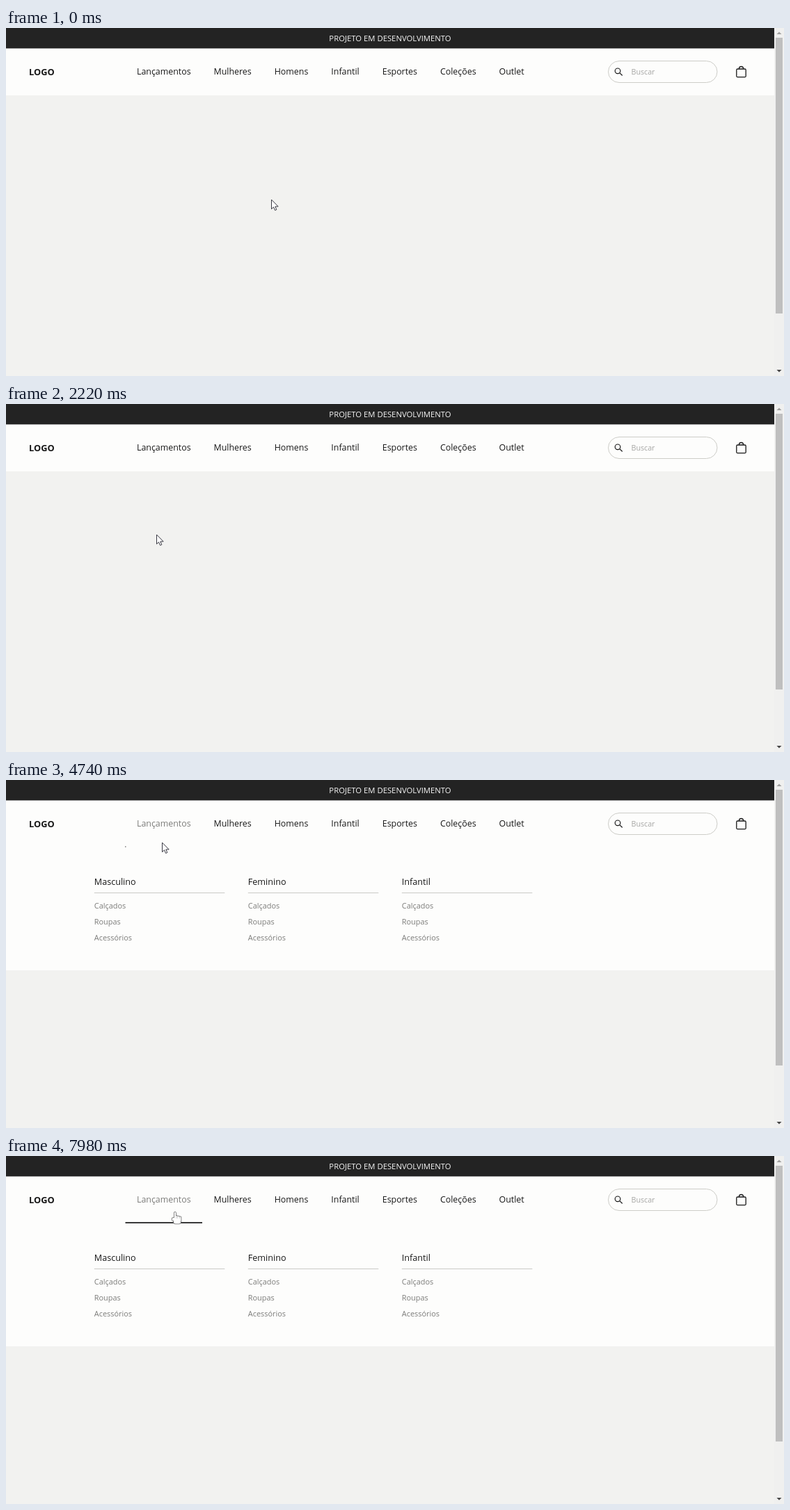
Write an HTML page with a canvas that moves like this. It is 1118 by 501 pixels and loops after 8000 ms.

```html
<!DOCTYPE html>
<html lang="pt-BR">
<head>
<meta charset="utf-8">
<title>Menu da loja</title>
<style>
html, body { margin: 0; width: 100%; height: 100%; overflow: hidden; background: #f2f2f0; }
canvas { display: block; width: 100vw; height: 100vh; }
</style>
</head>
<body>
<canvas id="stage"></canvas>
<script>
const W = 1118, H = 501, LOOP = 8000;
const PAGE = 1104, BAR = 29.4, HEADER = 97, PANEL = 177;
const FONT = '"Open Sans", "Noto Sans", sans-serif';
const INK = '#181818', MUTED = '#7c7c7a', PAPER = '#fdfdfc', GROUND = '#f2f2f0';
const OPEN_AT = 4740, LINE_MS = 300;

const canvas = document.getElementById('stage');
const ctx = canvas.getContext('2d');
const ratio = window.devicePixelRatio || 1;
canvas.width = Math.round(W * ratio);
canvas.height = Math.round(H * ratio);
ctx.scale(canvas.width / W, canvas.height / H);

const nav = ['Lançamentos', 'Mulheres', 'Homens', 'Infantil', 'Esportes', 'Coleções', 'Outlet'];
const NAV_X = 188, NAV_GAP = 33;
const titles = ['Masculino', 'Feminino', 'Infantil'];
const links = ['Calçados', 'Roupas', 'Acessórios'];

// The pointer rests, then glides: start, end, destination
const glides = [
  { from: 960, to: 1280, x: 317, y: 242 },
  { from: 1400, to: 2000, x: 216, y: 188 },
  { from: 4170, to: 4740, x: 224, y: 90 },
  { from: 4780, to: 5180, x: 232, y: 61 },
  { from: 7260, to: 7980, x: 243, y: 80 }
];

const clamp = v => Math.max(0, Math.min(1, v));

function pointerAt(t) {
  let x = 381, y = 247;
  for (const g of glides) {
    const p = clamp((t - g.from) / (g.to - g.from));
    x += (g.x - x) * p;
    y += (g.y - y) * p;
  }
  return [Math.round(x), Math.round(y)];
}

function rect(color, x, y, w, h) {
  ctx.fillStyle = color;
  ctx.fillRect(x, y, w, h);
}

// Draws a line of text and returns its width
function text(str, x, y, size, color, weight = 400, align = 'left') {
  ctx.font = `${weight} ${size}px ${FONT}`;
  ctx.textAlign = align;
  ctx.fillStyle = color;
  ctx.fillText(str, x, y);
  return ctx.measureText(str).width;
}

function stroke(path, color, width) {
  ctx.strokeStyle = color;
  ctx.lineWidth = width;
  ctx.stroke(path);
}

function rounded(x, y, w, h, r, path = new Path2D()) {
  path.roundRect(x, y, w, h, r);
  return path;
}

function drawSearch() {
  stroke(rounded(865.5, 47.5, 156.5, 31, 15.5), '#cdcdc8', 1);
  text('Buscar', 898.5, 67, 10.7, '#a6a6a4');
  const lens = new Path2D();
  lens.arc(879, 61.8, 3.8, 0, Math.PI * 2);
  lens.moveTo(881.8, 64.6);
  lens.lineTo(885.3, 68);
  stroke(lens, INK, 1.2);
}

function drawBag() {
  const bag = rounded(1049.8, 59, 13.4, 11.7, 1.5);
  bag.moveTo(1053.4, 59);
  bag.arc(1056.5, 58.6, 3.1, Math.PI, 0);
  stroke(bag, INK, 1.3);
}

function drawNav(open) {
  let x = NAV_X;
  nav.forEach((name, i) => {
    x += text(name, x, 67, 12.4, open && i === 0 ? MUTED : INK) + NAV_GAP;
  });
}

function drawHeader(open) {
  rect(PAPER, 0, 0, PAGE, HEADER);
  rect('#232323', 0, 0, PAGE, BAR);
  text('PROJETO EM DESENVOLVIMENTO', PAGE / 2, 18.8, 11.3, '#f7f7f7', 400, 'center');
  text('LOGO', 33, 68, 12.8, INK, 700);
  drawNav(open);
  drawSearch();
  drawBag();
}

function drawPanel(t) {
  rect(PAPER, 0, HEADER, PAGE, PANEL);
  titles.forEach((title, i) => {
    const x = 126.8 + i * 221;
    text(title, x, 150.5, 12.6, INK);
    rect('#cacac6', x, 162, 187.5, 1);
    links.forEach((name, row) => text(name, x, 185 + row * 23, 10.9, MUTED));
  });
  const p = clamp((t - OPEN_AT) / LINE_MS);
  rect(INK, NAV_X - NAV_GAP / 2, 95.2, 110.5 * (1 - (1 - p) ** 2), 1.7);
}

function triangle(color, y, dir) {
  ctx.fillStyle = color;
  ctx.beginPath();
  ctx.moveTo(1107.5, y);
  ctx.lineTo(1114.5, y);
  ctx.lineTo(1111, y + dir * 3.5);
  ctx.fill();
}

function drawScrollbar() {
  rect('#f0f0ef', PAGE, 0, W - PAGE, H);
  rect('#bfbfbf', PAGE + 2, 14, 10, 397);
  triangle('#a0a0a0', 9, -1);
  triangle('#454545', 492, 1);
}

function drawArrow() {
  const arrow = new Path2D('M.5 .5V13.6L3.5 10.8L5.6 15.5L7.8 14.5L5.8 10H9.8Z');
  ctx.fillStyle = '#fff';
  ctx.fill(arrow);
  stroke(arrow, '#383842', 1);
}

// Index finger, three curled fingers, thumb and palm share one outline
function drawHand() {
  const edge = '#666';
  const fingers = new Path2D(), palm = new Path2D();
  rounded(-1.2, 0.8, 2.2, 12, 1.1, fingers);
  for (let i = 1; i < 4; i++) rounded(-1.2 + i * 2.5, 5.4 + i * 0.6, 2.2, 7, 1.1, fingers);
  rounded(-4.4, 9, 4, 4, 1.6, palm);
  rounded(-2, 10, 10, 7.5, 2.5, palm);
  stroke(palm, edge, 1.6);
  stroke(fingers, edge, 1.6);
  ctx.fillStyle = '#fff';
  ctx.fill(fingers);
  ctx.fill(palm);
}

function drawPointer(t) {
  ctx.save();
  ctx.translate(...pointerAt(t));
  if (t < 4780) drawArrow();
  else drawHand();
  ctx.restore();
}

function draw(t) {
  const open = t >= OPEN_AT;
  rect(GROUND, 0, 0, W, H);
  drawHeader(open);
  if (open) drawPanel(t);
  drawScrollbar();
  drawPointer(t);
}

ctx.lineCap = ctx.lineJoin = 'round';
const begin = performance.now();
function tick() {
  draw((performance.now() - begin) % LOOP);
  requestAnimationFrame(tick);
}
tick();
</script>
</body>
</html>
```
